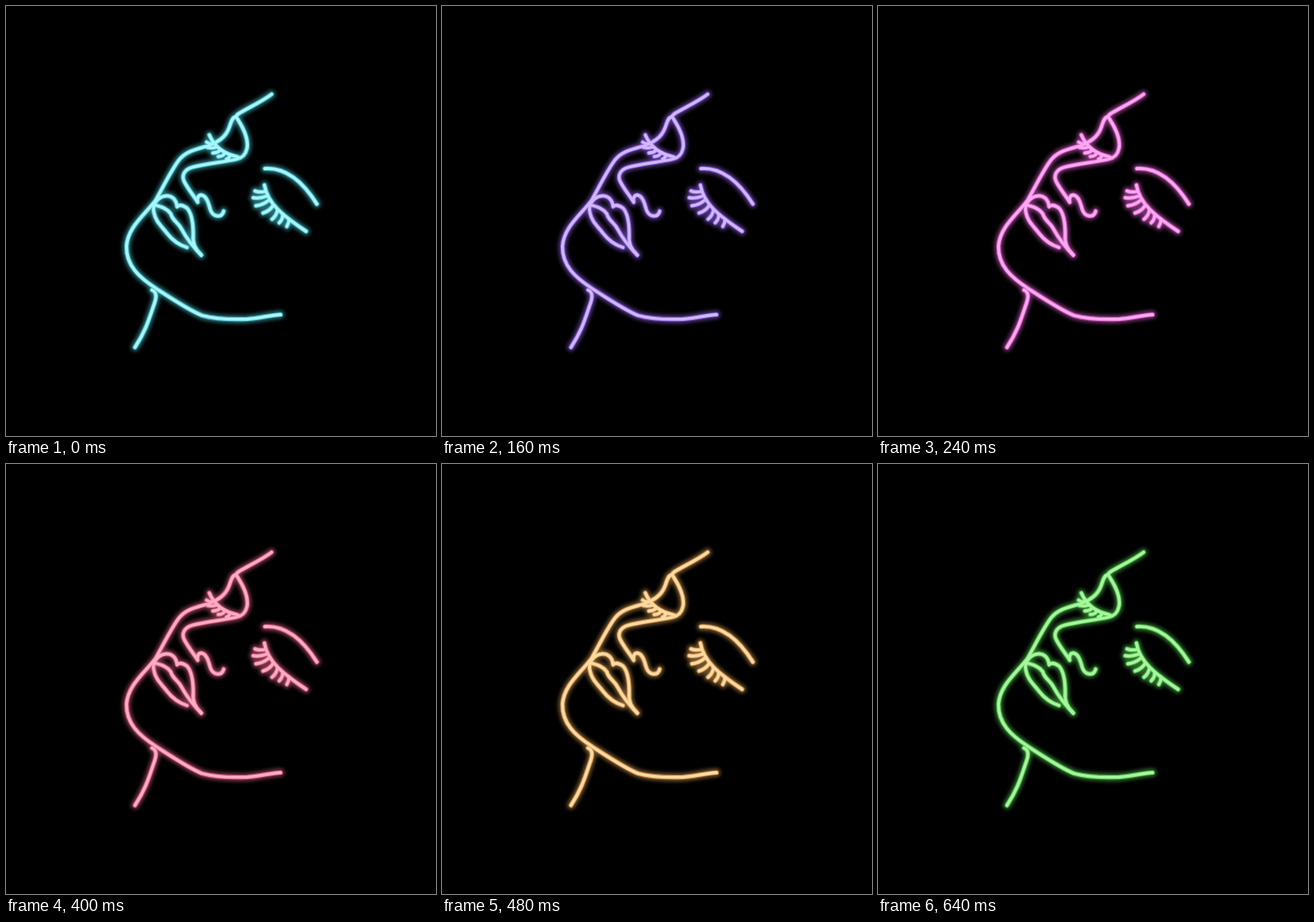
An HTML page for the animation above (0.72 s loop, 480 px wide and 480 px high).

```html
<!DOCTYPE html>
<html lang="en">
<head>
<meta charset="utf-8">
<title>Neon face</title>
<style>
  html, body { margin: 0; width: 100%; height: 100%; overflow: hidden; background: #000; }
  svg { display: block; width: 100vw; height: 100vh; }
  use { fill: none; stroke: currentColor; stroke-linecap: round; stroke-linejoin: round; }
  .halo { stroke-width: 9; opacity: .55; filter: blur(2.2px); }
  .tube { stroke-width: 5.2; opacity: .85; filter: blur(.7px); }
  .core { stroke-width: 3.3; filter: blur(.5px); }
</style>
</head>
<body>
<svg viewBox="0 0 480 480">
  <defs>
    <g id="face">
      <!-- brow and nose -->
      <path d="M296.500 98.500C287 106 268 115 260 120C256 122.500 257 124 259 127C266 138 271 149 269 159C267 168 262 170 257 171C244 174 222 176 208 180C198 183 196 190 199 196C203 204 209 211 214 219C213 214 215 211 218 211C224 212 226 220 228 227C231 236 241 237 243 229"/>
      <!-- profile and jaw -->
      <path d="M257 123.500C252 124 251 131 249 136C245 147 236 152 226 156C212 160 201 162 193 172C184 184 176 201 167 217C154 234 136 247 134.500 268C134 290 149 303 167 315C187 328 205 340 219 345.500C235 350 255 350 269 349.500C283 348.500 295 345 306.500 344.500"/>
      <path d="M163 317C168 319 168 325 166 331C160 348 157 361 144 381"/>
      <!-- lips -->
      <path d="M218 278C211 271 208 265 209 255C209 243 207 231 202 225.500C197 222 193 222 191 224C190 215 184 211 178 212C170 213 163 221 165 230C167 241 174 246 180 254C187 263 194 267 202 269.500"/>
      <path d="M166 222C173 224 180 226 184 232C186 240 193 242 196 249C203 262 210 270 218 278"/>
      <!-- near eye -->
      <path d="M289 181.500C311 180 330 194 347 221"/>
      <path d="M288.500 200C292 221 310 235 335 251.500"/>
      <path d="M278 206.500Q283 208.500 289 207M276 214Q283 215 290 212.500M279 223Q287 222 293 217M287 231Q294 229 298 223M297 238Q302 234 303 228M305 242Q309 238 309 233M313.500 246Q316 242 316 238"/>
      <!-- far eye -->
      <path d="M227 144C232 156 242 165 259 168.500"/>
      <path d="M224 152Q228 155 232 153M225 158Q230 159 235 157.500M231 164Q236 164 239 161M237 168Q242 168 244 164.500M246 171Q249 170 250 167"/>
    </g>
  </defs>
  <use class="halo" href="#face"/>
  <use class="tube" href="#face"/>
  <use class="core" href="#face"/>
</svg>
<script>
  const STEP = 80;
  // [glow, core] for each step
  const colors = [
    ['#4fc4cf', '#a6f6fb'],
    ['#5a8fe0', '#a9cfff'],
    ['#8d62e0', '#d0b6ff'],
    ['#d25fc4', '#ffa6f2'],
    ['#d85fa6', '#ffa6d8'],
    ['#da6285', '#ffabc4'],
    ['#d29a55', '#ffd9a0'],
    ['#c4c152', '#f8f69c'],
    ['#58c455', '#a5f79b']
  ];
  const cycle = (name, shade) => {
    const steps = colors.map((pair, i) => ({
      color: pair[shade], offset: i / colors.length, easing: 'step-end'
    }));
    steps.push({ color: colors[colors.length - 1][shade], offset: 1 });
    document.querySelector(name).animate(steps, {
      duration: STEP * colors.length, iterations: Infinity
    });
  };
  cycle('.halo', 0);
  cycle('.tube', 0);
  cycle('.core', 1);
</script>
</body>
</html>
```
